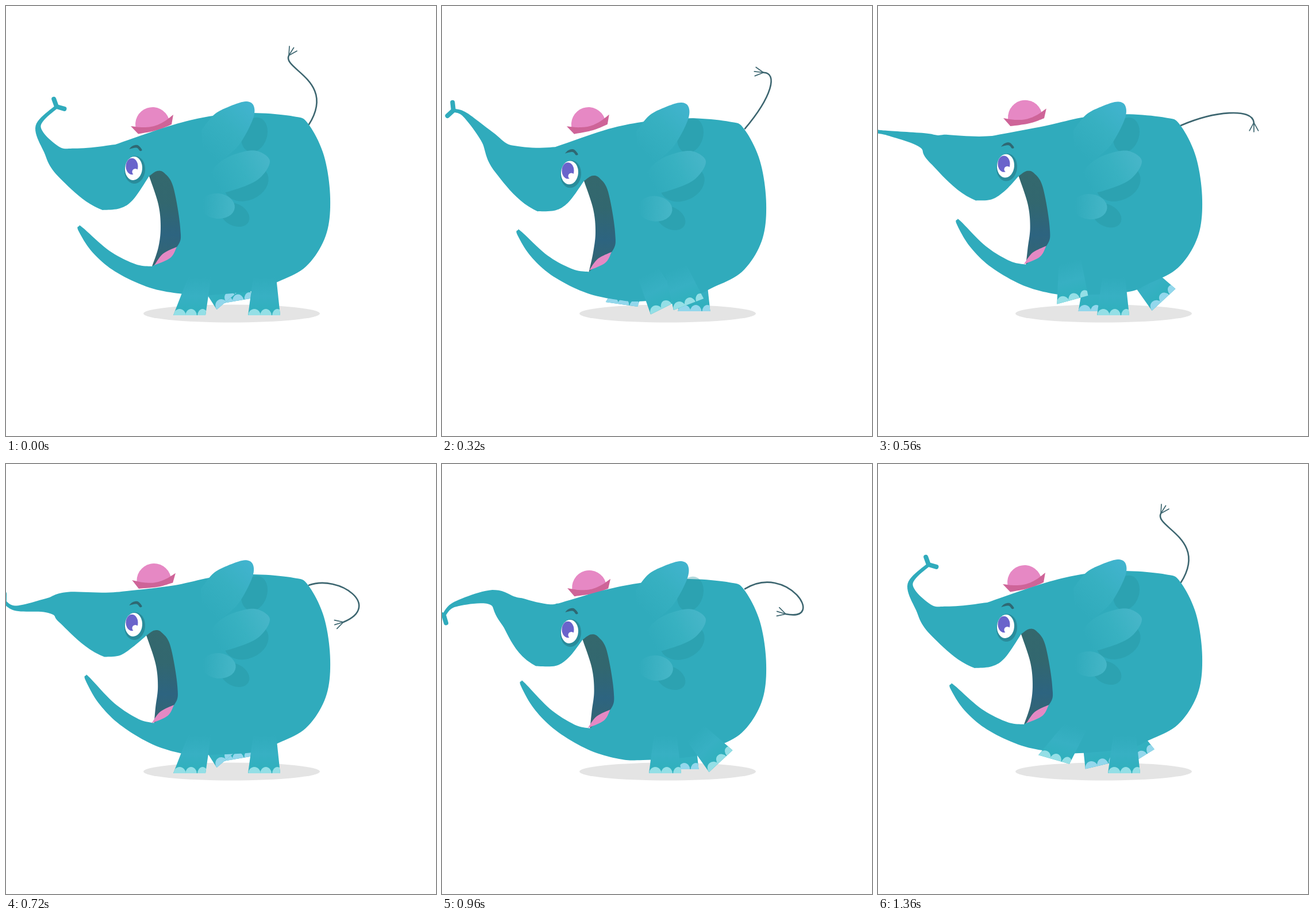
An HTML page with a canvas for the animation above (1400 ms loop, 748 by 748 pixels).

```html
<!DOCTYPE html>
<html lang="en">
<head>
<meta charset="utf-8">
<title>Walking elephant</title>
<style>
html, body { margin: 0; width: 100%; height: 100%; overflow: hidden; background: #fff; }
canvas { display: block; width: 748px; height: 748px; }
</style>
</head>
<body>
<canvas id="stage" width="748" height="748"></canvas>
<script>
const ctx = document.getElementById('stage').getContext('2d');
const LOOP = 1400, STEP = 40, SWAY = 1360, STRIDE = 720;
const SKIN = '#30abbc', HAIR = '#3d6670', SHADE = 'rgba(38,145,156,.35)';

// Catmull-Rom / Hermite value between b and c, with time gaps around them.
function hermite(a, b, c, d, u, before = 1, span = 1, after = 1) {
  const m = (c - a) * span / (before + span), n = (d - b) * span / (span + after);
  return b + m * u + (3 * (c - b) - 2 * m - n) * u * u + (2 * (b - c) + m + n) * u ** 3;
}

// Periodic track; each key is [time, ...values].
function track(keys, period, smooth) {
  const n = keys.length;
  const key = i => keys[(i + n) % n];
  const time = i => key(i)[0] + Math.floor(i / n) * period;
  return ms => {
    const t = ms % period;
    let i = n - 1;
    while (key(i)[0] > t) i--;
    const span = time(i + 1) - time(i), u = (t - time(i)) / span;
    return key(i).slice(1).map((b, k) => {
      const v = j => key(j)[k + 1];
      if (!smooth) return b + (v(i + 1) - b) * u;
      return hermite(v(i - 1), b, v(i + 1), v(i + 2), u,
        time(i) - time(i - 1), span, time(i + 2) - time(i + 1));
    });
  };
}

// Back, belly, jaw x, jaw y, face, hat and hat tilt.
const sway = track([
  [0, 0, 0, 0, 0, 0, 0, 0],
  [200, 15, 18, 1, 16, 15, 14, 0],
  [440, 2, 1, 9, -5, -2, -14, 0],
  [720, 6, 3, 12, -15, -3, -3, 6],
  [960, 14, 12, 11, -5, 9, 9, 3],
  [1160, 10, 13, 7, 7, 9, 0, 0]
], SWAY, true);

// Centre line of the trunk, from tip to head.
const GIRTH = [3, 4.5, 13, 29, 58];
const trunk = track([
  [0, 88,175, 56,209, 78,250, 107,274, 179,298],
  [200, 43,167, 54,188, 77,237, 110,279, 179,311],
  [440, 3,201, 26,199, 81,225, 110,254, 184,289],
  [720, -3,240, 18,251, 73,246, 104,250, 184,279],
  [960, 3,263, 23,244, 86,232, 122,257, 183,297],
  [1160, 0,207, 38,215, 85,239, 114,267, 182,302]
], SWAY, true);

// Two Bezier handles and the end of the tail.
const tail = track([
  [0, 575,130, 480,110, 492,86],
  [200, 575,140, 525,95, 490,109],
  [440, 575,176, 645,145, 641,130],
  [520, 585,180, 650,160, 666,181],
  [720, 580,192, 655,247, 587,275],
  [960, 600,172, 670,275, 598,261],
  [1160, 580,165, 580,85, 611,116]
], SWAY, true);

// Middle of the sole and turn in degrees.
const frontFoot = track([
  [0, 319,538,0], [240, 388,538,0], [360, 388,517,-40], [440, 387,507,-62], [640, 306,514,16]
], STRIDE);
const rearFoot = track([
  [0, 449,538,0], [80, 474,533,-10], [200, 497,518,-43], [240, 485,517,-43],
  [360, 401,520,-10], [440, 404,518,0], [560, 409,538,0], [640, 428,538,0]
], STRIDE);

function spline(pts, steps = 10) {
  const at = i => pts[Math.max(0, Math.min(pts.length - 1, i))];
  const out = [];
  for (let i = 0; i < pts.length - 1; i++)
    for (let s = 0; s < steps; s++)
      out.push(at(i).map((b, k) => hermite(at(i - 1)[k], b, at(i + 1)[k], at(i + 2)[k], s / steps)));
  return [...out, pts[pts.length - 1]];
}

function fill(color, pts) {
  ctx.beginPath();
  pts.forEach(p => ctx.lineTo(p[0], p[1]));
  ctx.closePath();
  ctx.fillStyle = color;
  ctx.fill();
}

function oval(color, x, y, rx, ry, turn = 0, from = 0, to = 2 * Math.PI) {
  ctx.beginPath();
  ctx.ellipse(x, y, rx, ry, turn, from, to);
  ctx.fillStyle = color;
  ctx.fill();
}

function stroke(width, color, draw) {
  ctx.beginPath();
  draw();
  ctx.lineWidth = width;
  ctx.strokeStyle = color;
  ctx.stroke();
}

function fade(x0, y0, x1, y1, ...colors) {
  const g = ctx.createLinearGradient(x0, y0, x1, y1);
  colors.forEach((c, i) => g.addColorStop(i / (colors.length - 1), c));
  return g;
}

const shift = (pts, dx, dy) => pts.map(([x, y]) => [x + dx, y + dy]);

// Short strokes fanned around the direction that leads from one point to the next.
function fan(from, [x, y], angles, length, width, color) {
  const dir = Math.atan2(y - from[1], x - from[0]);
  for (const a of angles) stroke(width, color, () => {
    ctx.moveTo(x, y);
    ctx.lineTo(x + length * Math.cos(dir + a), y + length * Math.sin(dir + a));
  });
}

function leg([x, y, turn], lean, lift, toes) {
  ctx.save();
  ctx.translate(x, y - lift);
  ctx.rotate(turn * Math.PI / 180);
  fill(fade(0, -66, 0, 0, SKIN, '#37b0c3', '#2eb0bc'), [[-28, 0], [lean - 20, -66], [lean + 20, -66], [28, 0]]);
  ctx.clip();
  for (let k = 0; k < 3; k++) oval(toes, 20 * k - 17, 1, 11 - k, 12);
  ctx.restore();
}

function legs(t, lift, toes) {
  const front = frontFoot(t), rear = rearFoot(t);
  const pair = [[front, (390 - front[0]) / 4], [rear, 1]];
  if (lift) pair.reverse();
  for (const [foot, lean] of pair) leg(foot, lean, lift, toes);
}

function drawTail(t, back) {
  const [ax, ay, bx, by, x, y] = tail(t);
  stroke(2.6, HAIR, () => {
    ctx.moveTo(527, 206 + back * .8);
    ctx.bezierCurveTo(ax, ay, bx, by, x, y);
  });
  fan([bx, by], [x, y], [-.4, .1, .6], 16, 1.7, HAIR);
}

function drawBody(t, [back, belly, jawX, jawY]) {
  const flat = trunk(t);
  const core = GIRTH.map((h, i) => [flat[2 * i], flat[2 * i + 1], h]);
  const [tip, next] = core, head = core[4];
  const nod = head[1] - 298, mx = -.4 * jawX, my = .8 * belly;
  const corner = [249 + mx, 296 + my];

  // Both edges of the trunk follow its centre line at a growing distance.
  const line = spline([...core, [head[0] + 70, head[1], 58]], 12).slice(0, -12);
  const edge = side => line.map(([x, y, h], i) => {
    const p = line[Math.max(0, i - 1)], q = line[Math.min(line.length - 1, i + 1)];
    const dx = q[0] - p[0], dy = q[1] - p[1], k = side * h / Math.hypot(dx, dy);
    return [x + dy * k, y - dx * k];
  });
  const top = edge(1), low = edge(-1);
  const rump = [[290, 207 + back * .75], ...shift([[360,191], [430,186], [500,192], [525,204],
    [553,260], [564,335], [556,400], [522,453], [470,481]], 0, back), [435, 495 + back], [350, 503 + belly]];
  const chin = [[308,501], [250,490], [190,462], [150,428], [126,391], [127,383], [134,386],
    [180,426], [225,449], [254,453]].map(([x, y]) => {
    const w = (308 - x) / 180;
    return [x + jawX * w, y + jawY * w + belly * (1 - w)];
  });
  const under = chin[chin.length - 1];
  const snout = spline([low[low.length - 1], ...shift([[198,352], [221,337]], 0, nod), corner]);
  fill(SKIN, [...top, ...spline([top[top.length - 1], ...rump, ...chin]),
    ...shift([[288,405], [285,330]], mx, my), ...snout.reverse(), ...low.reverse()]);
  fan(next, tip, [-1.1, 1.1], 14, 8, SKIN);

  const tongue = (my + under[1] - 453) / 2;
  fill(fade(0, 288 + my, 0, 453 + my, '#34686d', '#32676f', '#2d6480', '#36666f'), [
    ...spline([under, ...shift([[265,420], [269,385], [265,345]], mx, my), corner]),
    ...spline([corner, ...shift([[263,287], [276,291], [291,315], [303,385]], mx, my),
      [298 + mx, 418 + tongue], under])
  ]);
  const lip = shift([[258,451], [273,431], [297,419], [286,438]], mx, tongue);
  fill('#e489c4', [...spline(lip.slice(0, 3)), ...spline([lip[2], lip[3], lip[0]])]);
}

function drawEar(e) {
  oval(SHADE, 432, 224 + 2 * e, 22, 31, .3);
  oval(SHADE, 418, 308 + e, 40, 30, -.4);
  oval(SHADE, 398, 363 + 9 * e, 27, 19, .5);
  fill(fade(350, 255, 428, 170, SKIN, '#37b0c1', '#42b4cf'), spline(shift([[340,216], [362,189],
    [388,175], [417,166], [431,174], [429,198], [405,242], [374,270], [345,300]], -3 * e, 3 * e)));
  fill(fade(365, 310, 458, 262, SKIN, '#38b1c1', '#48b6c9'), spline(shift([[350,295], [374,270],
    [404,256], [436,252], [459,270], [438,302], [390,322], [355,328]], 0, e)));
  oval(fade(343, 348, 398, 350, SKIN, '#45b6c7'), 368 + 4 * e, 348 + 7 * e, 30, 22, .1);
}

function drawFace(dy) {
  ctx.save();
  ctx.translate(0, dy);
  oval('#298c9b', 224, 285, 18, 24, .08);
  oval('#fff', 222, 282.5, 15, 20.5, .08);
  oval('#6a64cb', 219, 279, 10.5, 14.2);
  oval('#fff', 225, 288.5, 5.5, 5.5);
  fill('#2f6873', spline([[214,249], [220,243.5], [229,242], [236.5,250], [233,252], [227,246.5], [214,249]]));
  ctx.restore();
}

function drawHat(dy, tilt) {
  ctx.save();
  ctx.translate(255 + tilt * .4, 206 + dy);
  ctx.rotate(tilt * Math.PI / 180);
  oval('#e688c4', 0, 0, 30, 30, -.12, Math.PI - .2, 2 * Math.PI + .1);
  fill('#ce6498', [...spline([[-38, 3], [-18, 5], [2, 3], [20, -5], [36, -17]]),
    ...spline([[33, 0], [8, 10], [-25, 16.5]])]);
  ctx.restore();
}

function draw(t) {
  const pose = sway(t), [back, , , , face, hat, tilt] = pose;
  ctx.clearRect(0, 0, 748, 748);
  ctx.lineCap = ctx.lineJoin = 'round';
  oval('#e4e4e4', 392.5, 535, 153.5, 15.5);
  legs(t + STRIDE / 2, 7, '#93d7ec');
  drawTail(t, back);
  drawHat(hat, tilt);
  drawBody(t, pose);
  legs(t, 0, '#94dfe6');
  drawEar(back / 14);
  drawFace(face);
}

function tick() {
  draw(Math.floor(performance.now() % LOOP / STEP) * STEP);
  requestAnimationFrame(tick);
}
tick();
</script>
</body>
</html>
```
